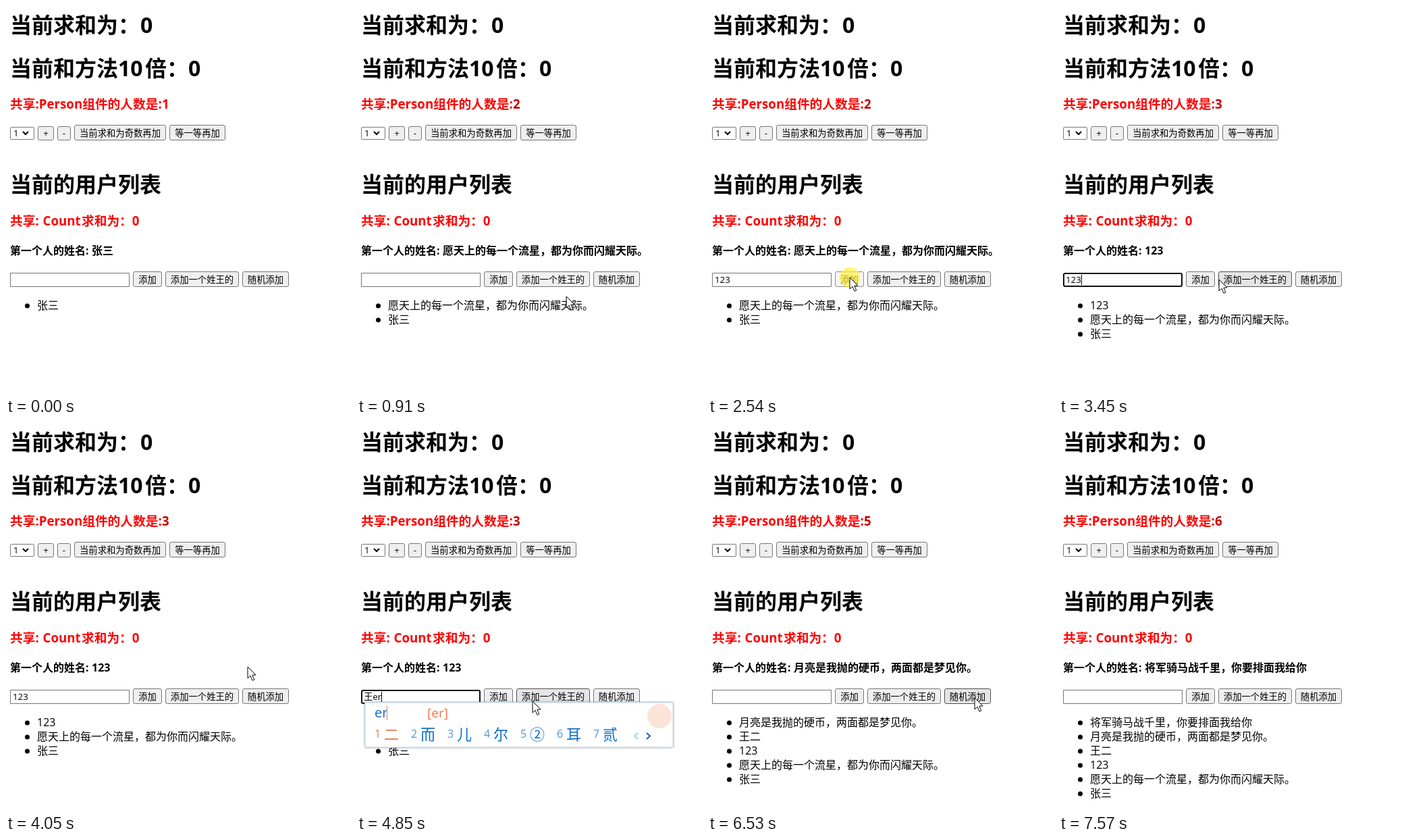
Recreate the animation shown at these times as an HTML page with a canvas. Size 511 by 576 pixels, loop 7920 ms.

```html
<!DOCTYPE html>
<html lang="zh-CN">
<head>
<meta charset="utf-8">
<title>用户列表</title>
<style>
  html, body { margin: 0; width: 100%; height: 100%; overflow: hidden; background: #fff; }
  canvas { display: block; }
</style>
</head>
<body>
<canvas id="stage" width="511" height="576"></canvas>
<script>
const canvas = document.getElementById('stage');
const ctx = canvas.getContext('2d');
const FONT = '"Open Sans", "Noto Sans CJK SC", "Noto Sans CJK", sans-serif';
const SMALL = 13.333, H1 = 32, H3 = 18.72;

// All times in ms.
const LOOP = 7920, TICK = 50, PRESS = 100, BLINK = 520, KEY = 100;
const DIGITS_START = 2050, IME_START = 4850, IME_END = 4920;

const spot = {
  start: { x: 454, y: 600 },
  random: { x: 395, y: 407 },
  field: { x: 124, y: 407 },
  add: { x: 210, y: 402 },
  wang: { x: 260, y: 412 },
  aside: { x: 382, y: 348 },
  below: { x: 435, y: 531 },
  exit: { x: 454, y: 577 }
};

// The pointer glides to a spot, may press there, and the release may add a user.
const steps = [
  { from: 0, to: 340, to_: spot.random, press: 580, user: '愿天上的每一个流星，都为你而闪耀天际。' },
  { from: 740, to: 1170, to_: spot.field, bow: 28, press: 1370 },
  { from: 2250, to: 2490, to_: spot.add, press: 2530, user: '123' },
  { from: 2780, to: 2960, to_: spot.field, press: 3000 },
  { from: 3170, to: 3550, to_: spot.wang, bow: -12, press: 3600 },
  { from: 3750, to: 4170, to_: spot.aside },
  { from: IME_START, to: IME_START, to_: spot.wang, press: 5230, user: '王二' },
  { from: 5350, to: 6250, to_: spot.random, bow: 118, press: 6430, user: '月亮是我抛的硬币，两面都是梦见你。' },
  { from: 6600, to: 6600, to_: spot.random, press: 6620, user: '将军骑马战千里，你要排面我给你' },
  { from: 6750, to: 7310, to_: spot.below },
  { from: 7360, to: 7560, to_: spot.exit }
].map(({ to_, ...step }) => ({ ...step, spot: to_ }));

const between = (t, a, b) => t >= a && t < b;
const ease = k => k * k * (3 - 2 * k);

function pointerAt(time) {
  const t = Math.floor(time / TICK) * TICK;
  const i = steps.findLastIndex(s => s.from <= t);
  const { from, to, spot: b, bow = 0 } = steps[i];
  const a = i ? steps[i - 1].spot : spot.start;
  const k = t >= to ? 1 : ease((t - from) / (to - from));
  return {
    x: Math.round(a.x + (b.x - a.x) * k),
    y: Math.round(a.y + (b.y - a.y) * k + bow * Math.sin(Math.PI * k))
  };
}

function fieldValue(t) {
  if (t < IME_START) return '123'.slice(0, Math.max(0, Math.floor((t - DIGITS_START) / KEY) + 1));
  if (t < IME_END) return '王er';
  return t < 5330 ? '王二' : '';
}

// Time of the latest click or key in the field, or null when it has no focus.
function focusTime(t) {
  const last = steps.findLast(s => s.press <= t);
  if (between(t, IME_START, 5230)) return IME_START;
  if (!last || last.spot !== spot.field) return null;
  const lastKey = DIGITS_START + 2 * KEY;
  return t < DIGITS_START ? last.press : Math.max(last.press, Math.min(t, lastKey));
}

function text(str, x, y, size, color = '#000', weight = 400) {
  ctx.font = `${weight} ${size}px ${FONT}`;
  ctx.fillStyle = color;
  ctx.fillText(str, x, y);
}

const bold = (str, x, y, size, color) => text(str, x, y, size, color, 700);

function box(x, y, w, h, r, fill, stroke, width = 1) {
  ctx.beginPath();
  ctx.roundRect(x, y, w, h, r);
  ctx.fillStyle = fill;
  ctx.fill();
  ctx.strokeStyle = stroke;
  ctx.lineWidth = width;
  ctx.stroke();
}

function line(points, color, width) {
  ctx.beginPath();
  points.forEach(([x, y]) => ctx.lineTo(x, y));
  ctx.strokeStyle = color;
  ctx.lineWidth = width;
  ctx.stroke();
}

function disc(x, y, r, color) {
  ctx.beginPath();
  ctx.arc(x, y, r, 0, Math.PI * 2);
  ctx.fillStyle = color;
  ctx.fill();
}

// A row of buttons, each as wide as its label.
function buttonRow(x, mid, labels, p, down) {
  for (const label of labels) {
    ctx.font = `400 ${SMALL}px ${FONT}`;
    const textWidth = ctx.measureText(label).width;
    const w = Math.round(textWidth + 16), h = label.length > 1 ? 23 : 21;
    const y = mid - 12 + (23 - h);
    const over = between(p.x, x, x + w) && between(p.y, y, y + h);
    const [fill, edge] = !over ? ['#efefef', '#767676'] : down ? ['#f5f5f5', '#8d8d8d'] : ['#e5e5e5', '#4f4f4f'];
    box(x + .5, y + .5, w - 1, h - 1, 2.5, fill, edge);
    text(label, x + (w - textWidth) / 2, mid + 5, SMALL);
    x += w + 5;
  }
}

function drawSelect() {
  box(6.5, 179.5, 35, 18, 1, '#fff', '#767676');
  text('1', 11, 193, SMALL);
  line([[25, 186], [29, 190], [33, 186]], '#000', 2);
}

function drawField(t) {
  const value = fieldValue(t), since = focusTime(t);
  if (since === null) box(6.5, 395.5, 176, 20, 0, '#fff', '#767676');
  else box(7, 396, 175, 19, 2, '#fff', '#101010', 2);
  text(value, 10, 410, SMALL);
  if (since !== null && (t - since) % (2 * BLINK) < BLINK) {
    ctx.fillStyle = '#000';
    ctx.fillRect(Math.round(10 + ctx.measureText(value).width), 398, 1, 15);
  }
}

function drawIme() {
  const blue = '#0a6ccb', orange = '#f0764c';
  const chevron = (x, dir, color) =>
    line([[x, 459], [x + 5 * dir, 463.5], [x, 468]], color, 1.8);
  ctx.save();
  ctx.shadowColor = 'rgba(60, 90, 120, .35)';
  ctx.shadowBlur = 3;
  box(11.5, 413.5, 457, 67, 2, '#fff', '#b4cde0');
  ctx.restore();
  disc(448, 434, 18, '#fbe3d8');
  text('er', 26, 436, 20, blue);
  line([[44.5, 419], [44.5, 440]], orange, 1);
  text('[er]', 104, 436, 19, orange);
  [...'二而儿尔②耳贰'].forEach((ch, i) => {
    const x = 26 + i * 54;
    text(i + 1, x, 466, 16, i ? '#4d94d2' : orange);
    text(ch, x + 14, 469, 22, i ? blue : orange);
  });
  chevron(416, -1, '#9ccbea');
  chevron(429, 1, '#0a5cab');
}

function drawPointer({ x, y }) {
  if (between(x, 6, 183) && between(y, 395, 416)) {
    for (const dy of [-8.5, 8.5]) line([[x - 3, y + dy], [x + 4, y + dy]], '#000', 1);
    line([[x + .5, y - 8], [x + .5, y + 8]], '#000', 1);
    return;
  }
  ctx.save();
  ctx.translate(x, y);
  const arrow = new Path2D('M0 0V17L4 13.3 7 20.3 9.8 19 6.8 12.3 12 12Z');
  ctx.fillStyle = '#fff';
  ctx.fill(arrow);
  ctx.strokeStyle = '#000';
  ctx.lineWidth = 1;
  ctx.stroke(arrow);
  ctx.restore();
}

function draw(t) {
  const p = pointerAt(t);
  const down = steps.some(s => between(t, s.press, s.press + PRESS));
  const added = steps.filter(s => s.user && s.press + PRESS <= t).map(s => s.user);
  const list = ['张三', ...added].reverse();

  ctx.fillStyle = '#fff';
  ctx.fillRect(0, 0, canvas.width, canvas.height);

  bold('当前求和为：', 6, 40, H1);
  bold('0', 199, 40, H1);
  bold('当前和方法10', 6, 104, H1);
  bold('倍：0', 206, 104, H1);
  bold('共享:Person组件的人数是:', 6, 152, H3, '#f00');
  bold(list.length, 231, 152, H3, added.length ? '#c80000' : '#f00');
  drawSelect();
  buttonRow(47, 188, ['+', '-', '当前求和为奇数再加', '等一等再加'], p, down);

  bold('当前的用户列表', 6, 276, H1);
  bold('共享:', 6, 325, H3, '#f00');
  bold('Count', 54.5, 325, H3, '#f00');
  bold('求和为：0', 112, 325, H3, '#f00');
  bold('第一个人的姓名:', 6, 368, 16);
  bold(list[0], 127, 368, 16);
  drawField(t);
  buttonRow(188, 405, ['添加', '添加一个姓王的', '随机添加'], p, down);

  list.forEach((name, i) => {
    disc(31.5, 444 + i * 21, 3.5, '#000');
    text(name, 46, 449 + i * 21, 16);
  });

  if (between(t, IME_START, IME_END)) drawIme();
  if (down) disc(p.x, p.y, 15, 'rgba(255, 242, 60, .7)');
  drawPointer(p);
}

const start = performance.now();
function tick() {
  draw((performance.now() - start) % LOOP);
  requestAnimationFrame(tick);
}
tick();
</script>
</body>
</html>
```
